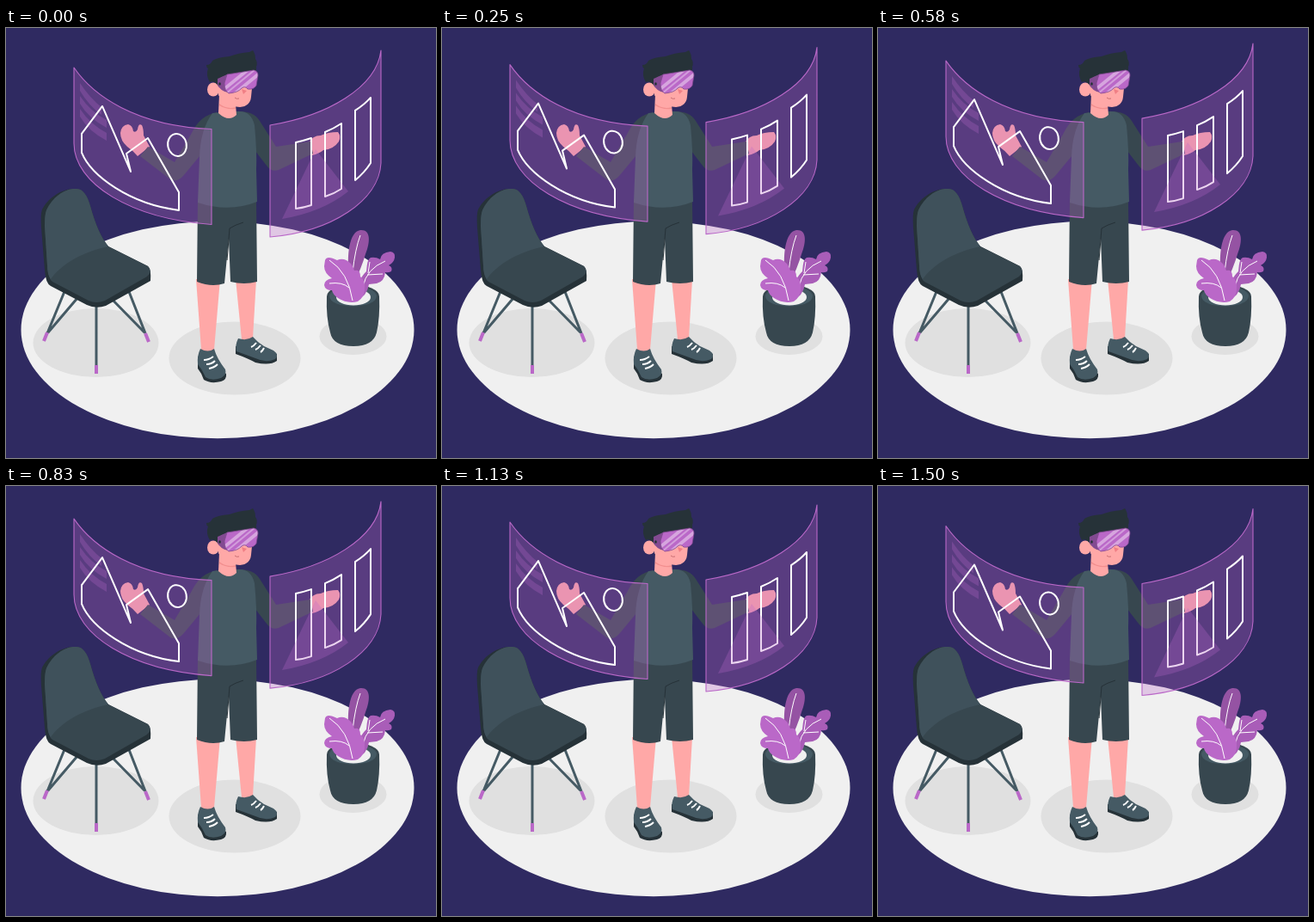
Recreate the animation shown at these times as an HTML page with a canvas. Size 500 by 500 pixels, loop 1.54 s.

```html
<!DOCTYPE html>
<html lang="en">
<head>
<meta charset="utf-8">
<title>Virtual reality panels</title>
<style>
html, body { margin: 0; width: 100%; height: 100%; overflow: hidden; background: #2f2a61; }
canvas { display: block; width: 100vw; height: 100vh; }
</style>
</head>
<body>
<canvas id="stage" width="500" height="500"></canvas>
<script>
const ctx = document.getElementById('stage').getContext('2d');
const SKIN = '#ffa8a7', DARK = '#263238', SLATE = '#37474f', STEEL = '#455a64', PURPLE = '#ba68c8';
const LOOP = 1540, FPS = 24, PEAK = 708, TOP = -9.6, TRAVEL = 10.4;

function fill(d, color, alpha = 1) {
  ctx.globalAlpha = alpha;
  ctx.fillStyle = color;
  ctx.fill(new Path2D(d));
  ctx.globalAlpha = 1;
}

function line(d, color, width = 1, alpha = 1) {
  ctx.globalAlpha = alpha;
  ctx.strokeStyle = color;
  ctx.lineWidth = width;
  ctx.stroke(new Path2D(d));
  ctx.globalAlpha = 1;
}

function oval(x, y, rx, ry, color) {
  ctx.beginPath();
  ctx.ellipse(x, y, rx, ry, 0, 0, Math.PI * 2);
  ctx.fillStyle = color;
  ctx.fill();
}

function drawFloor() {
  ctx.fillStyle = '#2f2a61';
  ctx.fillRect(0, 0, 500, 500);
  oval(246, 351, 228.5, 126.3, '#f0f0f0');
  oval(104.5, 366, 73, 40, '#e0e0e0');
  oval(266, 384, 76.5, 42.5, '#e0e0e0');
  oval(403.5, 358.5, 39, 21.5, '#e0e0e0');
}

function drawChair() {
  line('M69 304L48 355M89 307L49 354M142 304L162 355M115 307L161 354M105 320V393', STEEL, 3);
  line('M48 354L44 364M162 355L166 365M105 392V402', PURPLE, 4);
  fill('M42 211C48 199 64 186 81 187C90 187 95 196 98 207Q107 240 119 254L165 277Q169 280 168 294L116 323Q105 327 94 322L52 300Q46 297 45 281L41 232Q40 216 42 211Z', DARK);
  fill('M47 212C54 197 68 186 82 187C90 187 95 196 98 207Q107 240 119 254L165 277Q171 283 164 289L115 317Q105 321 96 317L54 295Q49 292 48 276L45 230Q45 217 47 212Z', SLATE);
  fill('M47 212C54 197 68 186 82 187C90 187 95 196 98 207Q107 240 119 254C91 260 67 272 52 292Q48 287 48 276L45 230Q45 217 47 212Z', '#3f515b');
}

function drawPlant() {
  fill('M373 312Q372 336 377 354Q380 370 404 370Q427 370 431 354Q435 336 434 312Z', SLATE);
  oval(403.5, 312, 30.5, 13.5, SLATE);
  oval(403.5, 312, 27.5, 11.5, STEEL);
  oval(404, 313, 20, 9.5, '#f0f0f0');
  fill('M399 288C396 264 399 237 412 235C424 234 424 248 418 263Q413 280 405 295Z', '#9553a3');
  line('M403 284Q406 257 412 241', '#fff', 1);
  fill('M407 317C406 300 412 290 419 283Q420 268 424 267Q430 266 435 269Q436 261 447 260Q453 261 452 267Q451 273 445 276Q450 278 448 283Q444 285 441 284Q440 295 431 297L422 298Q420 312 407 317Z', '#a95db8');
  line('M415 301Q419 280 441 271M421 285L423 272M420 287L438 286', '#fff', 1);
  fill('M371 270Q373 264 385 270Q393 266 401 274Q404 278 405 282Q412 280 412 289Q417 293 417 300Q418 312 409 318Q397 321 386 314Q380 310 379 305Q371 305 370 299Q370 293 379 291Q370 285 370 277Z', PURPLE);
  line('M376 270Q398 284 403 317M376 297Q391 295 399 302', '#fff', 1);
}

function drawShoes() {
  fill('M223 382V396Q228 402 230 409Q238 414 250 411Q257 409 256 402L250 397Z', DARK);
  fill('M226 373Q235 378 242 373Q245 384 255 397Q257 403 250 407Q239 411 232 406Q228 397 223 391Q222 381 226 373Z', STEEL);
  line('M230 386Q236 386 241 382M233 391Q239 391 243 387M236 396Q242 395 246 391', '#fff', 2);
  fill('M267 370V379Q281 384 290 389Q307 393 315 387V379Z', DARK);
  fill('M270 361Q280 364 287 359Q292 365 300 370L311 375Q318 380 313 385Q302 390 290 384L268 376Q266 369 270 361Z', STEEL);
  line('M285 371Q288 370 291 366M290 374Q293 373 296 369M296 377Q298 376 300 372', '#fff', 2);
}

function drawBody() {
  fill('M221 292H249L242 374Q234 378 227 374Z', SKIN);
  fill('M267 292H291L287 361Q280 366 274 362Z', SKIN);
  drawShoes();
  fill('M223 199L222 295Q239 302 254 297L259 245L261 295Q277 299 292 295L291 199Z', SLATE);
  line('M257 270L260 233Q266 229 276 226', DARK, 1);

  fill('M153 149Q147 142 141 138Q133 131 133 122Q134 113 142 112Q147 113 148 120Q151 122 153 118Q154 110 158 113Q160 117 160 125L167 138Z', SKIN);
  fill('M352 134Q356 125 366 125Q374 121 386 121Q390 126 387 132Q381 141 369 142Q364 146 356 148Z', SKIN);
  fill('M246 98Q226 101 216 122L196 156L165 138L156 149L191 176Q199 180 206 172L231 142Z', SLATE);
  fill('M268 97Q288 96 295 108L314 138L354 132L357 146L317 165Q309 168 303 160L286 138Z', SLATE);
  fill('M240 99L250 98L270 97Q285 96 289 113Q292 145 291 165L292 202Q259 215 223 203L225 150Q226 118 240 99Z', STEEL);
}

function drawHead() {
  fill('M248 77L247 99Q259 110 268 101L267 89Z', SKIN);
  fill('M248 88Q257 95 267 92L267 94Q255 95 248 90Z', '#f28f8f');
  fill('M247 50H288L285 80Q284 91 272 92Q255 91 247 78Z', SKIN);
  oval(241, 71.5, 7, 8, SKIN);
  fill('M237 63Q232 55 235 47Q233 46 233 43Q238 43 240 38Q246 34 260 33Q270 29 283 28L287 26Q290 30 290 36Q293 40 291 45Q292 50 288 52L251 57Q247 59 248 69L245 65Q241 61 237 63Z', DARK);
  line('M266 81Q268 83 271 82', '#c96f74', 1);
  fill('M274 71L276 77L280 73Z', '#f07f85');

  const visor = 'M257 54Q270 52 288 49Q293 50 293 55L291 67Q288 72 281 71Q278 67 274 70Q270 75 259 76Q254 73 254 64Z';
  fill('M246 59L257 54L258 75Q249 73 246 66Z', '#824a91');
  oval(248.5, 65, 1.3, 1.8, DARK);
  fill(visor, PURPLE);
  ctx.save();
  ctx.clip(new Path2D(visor));
  line('M250 74L282 48M264 78L298 50', '#fff', 4, .4);
  line('M256 76L290 48', '#fff', 2, .35);
  ctx.restore();
  line(visor, '#824a91', .8);
}

function panel(d) {
  fill(d, PURPLE, .3);
  line(d, PURPLE, 1.1);
}

function drawPanels(y) {
  ctx.save();
  ctx.translate(0, y);

  panel('M79 46C101 78 150 114 239 117.5V228.5C145 222 79 181 79 134Z');
  for (const [top, end] of [[64, 111], [79, 117], [94, 117]]) {
    fill(`M86 ${top}Q98 ${top + 18} ${end} ${top + 28}V${top + 37}Q96 ${top + 26} 86 ${top + 9}Z`, PURPLE, .27);
  }
  line('M112 91L88 123V145C99 172 144 205 201 212V191L165 128L140 146L145 167Z', '#fff', 2);
  ctx.beginPath();
  ctx.ellipse(199, 136, 10.8, 13, -.2, 0, Math.PI * 2);
  ctx.strokeStyle = '#fff';
  ctx.stroke();

  panel('M307 113C374 102 431 69 436 26V157C434 201 378 237 307 243Z');
  line('M337 133Q346 131 355 128V206Q346 209 337 210ZM371 121Q381 117 390 111V187Q381 193 371 196ZM406 96Q417 89 424 81V157Q417 168 406 177Z', '#fff', 2);
  fill('M321 222L360 141L398 190Q368 214 321 222Z', PURPLE, .28);
  ctx.restore();
}

// Linear rise and fall, stepped at the playback rate.
function panelOffset(time) {
  const step = Math.floor((time % LOOP + 5) * FPS / 1000);
  const distance = Math.abs(step * 1000 / FPS - PEAK);
  const fromPeak = Math.min(distance, LOOP - distance);
  return TOP + TRAVEL * fromPeak / (LOOP / 2);
}

function render(now) {
  drawFloor();
  drawChair();
  drawPlant();
  drawBody();
  drawHead();
  drawPanels(panelOffset(now - start));
}

function resize() {
  const scale = window.devicePixelRatio || 1;
  ctx.canvas.width = innerWidth * scale;
  ctx.canvas.height = innerHeight * scale;
  ctx.setTransform(ctx.canvas.width / 500, 0, 0, ctx.canvas.height / 500, 0, 0);
  ctx.lineJoin = 'round';
}

function loop() {
  render(performance.now());
  requestAnimationFrame(loop);
}

const start = performance.now();
addEventListener('resize', resize);
resize();
loop();
</script>
</body>
</html>
```
